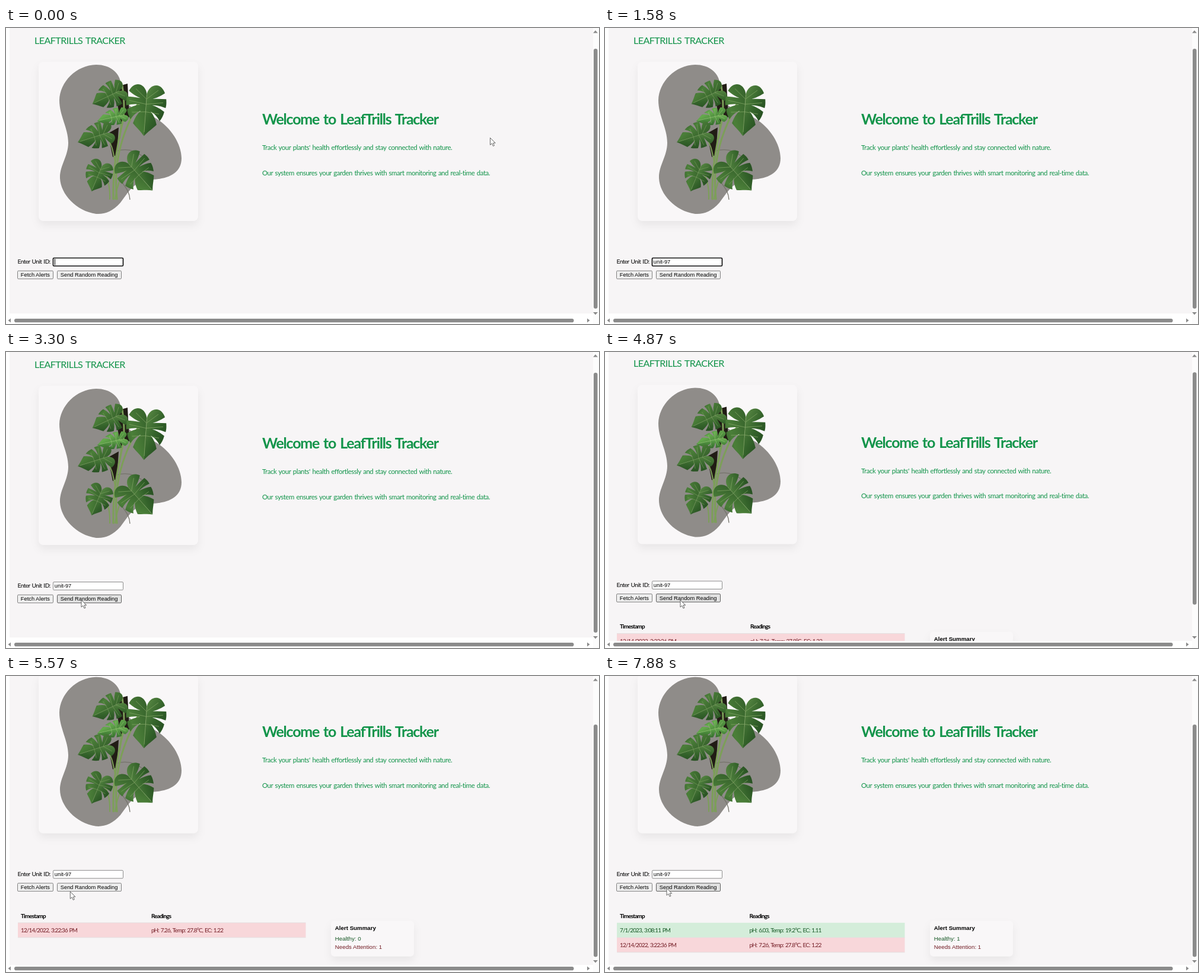
Write an HTML page that moves like this. It is 1000 px wide and 500 px high and loops after 8000 ms.

```html
<!DOCTYPE html>
<html lang="en">
<head>
<meta charset="utf-8">
<title>Plant monitor</title>
<style>
  html, body { margin: 0; width: 100%; height: 100%; overflow: hidden; background: #fff; }
  svg { display: block; width: 100vw; height: 100vh; }
  text { white-space: pre; }
  .hand { font-family: Lato, sans-serif; letter-spacing: -.038em; word-spacing: .09em; }
  .green { fill: #12944a; }
  .title { font-size: 16.2px; }
  .heading { font-size: 25px; font-weight: 700; letter-spacing: -.05em; }
  .lead { font-size: 11.4px; }
  .label { font-size: 10.2px; letter-spacing: -.055em; }
  .table { font-size: 9.9px; letter-spacing: -.08em; }
  .ui { font: 9.3px "Liberation Sans", Arial, sans-serif; }
  .summary { font: 9.72px "Liberation Sans", Arial, sans-serif; }
  .bold { font-weight: 700; }
  .healthy { fill: #155724; }
  .attention { fill: #721c24; }
  .button { fill: #efefef; stroke: #808080; }
  .shadow { filter: drop-shadow(0 7px 7px rgba(0, 0, 0, .06)); }
  .stem { fill: none; stroke: #7c9f58; stroke-width: 3; stroke-linecap: round; }
  .root { fill: none; stroke: #74736a; stroke-width: 1.3; }
  .bar { fill: #8b8b8b; }
</style>
</head>
<body>
<svg viewBox="0 0 1000 500" preserveAspectRatio="none">
  <defs>
    <linearGradient id="dark" x1="0" y1="0" x2="1" y2="1">
      <stop offset="0" stop-color="#5a8a45"/><stop offset=".45" stop-color="#35642b"/><stop offset="1" stop-color="#1b3f1a"/>
    </linearGradient>
    <linearGradient id="light" x1="0" y1="0" x2="1" y2="1">
      <stop offset="0" stop-color="#345f2a"/><stop offset=".6" stop-color="#4b7f39"/><stop offset="1" stop-color="#274f22"/>
    </linearGradient>
    <path id="half" d="M0-20C4-37 24-40 32-23Q22-16 11-13Q24-14 35-14C36-8 36-4 35 0Q22-4 11-3Q24 0 33 6C32 12 29 17 26 21Q18 10 9 7Q17 14 21 27C14 34 7 38 0 46Z"/>
    <g id="leaf">
      <use href="#half" fill="url(#dark)"/>
      <use href="#half" fill="url(#light)" transform="scale(-1 1)"/>
      <path d="M0-20V40M0-12L20-27M0-4L30-8M0 8L24 10M0-12L-20-27M0-4L-30-8M0 8L-24 10" fill="none" stroke="#86a868" stroke-width=".7"/>
    </g>
  </defs>

  <rect id="page" x="6" width="984" height="482" fill="#f7f5f6"/>

  <g id="content">
    <text class="hand title green" x="48" y="26.5">LEAFTRILLS TRACKER</text>
    <rect class="shadow" x="55" y="57" width="269" height="269" rx="8" fill="#f9f7f8"/>

    <path fill="#8f8c89" d="M152 62C176 62 195 76 194 101C194 126 215 139 240 147C271 157 296 192 296 220C296 245 274 255 246 256C216 257 206 278 193 295C180 310 166 315 152 314C117 309 91 279 91 252C91 232 105 216 105 194C105 169 90 148 90 122C91 91 118 63 152 62Z"/>
    <path fill="#211c15" d="M190 98L205 94L208 150L193 160L188 128ZM172 178L190 168L187 214L180 218Z"/>
    <path class="root" d="M186 208C205 202 220 208 232 218M192 255C200 268 208 274 209 290"/>
    <path class="stem" d="M181 289C180 240 186 215 190 190S204 150 196 97M187 289C182 240 190 200 205 165S220 130 236 112"/>
    <path class="stem" style="stroke-width:2" d="M184 226C180 205 178 195 168 180M175 289C176 265 170 248 160 235M184 289C188 262 194 248 210 232M192 186C195 168 194 160 190 149"/>
    <use href="#leaf" transform="translate(177 113) rotate(64) scale(.62 .76)"/>
    <use href="#leaf" transform="translate(236 133) rotate(4) scale(.95 1.08)"/>
    <use href="#leaf" transform="translate(183 150) rotate(76) scale(.4 .66)" style="filter:brightness(1.35)"/>
    <use href="#leaf" transform="translate(155 182) rotate(72) scale(.62 .78)"/>
    <use href="#leaf" transform="translate(156 247) rotate(22) scale(.64 .68)"/>
    <use href="#leaf" transform="translate(219 243) rotate(-42) scale(.88 .92)"/>

    <text class="hand heading green" x="432" y="163">Welcome to LeafTrills Tracker</text>
    <text class="hand lead green" x="432" y="206.3">Track your plants' health effortlessly and stay connected with nature.</text>
    <text class="hand lead green" x="432" y="248.8">Our system ensures your garden thrives with smart monitoring and real-time data.</text>

    <text class="hand label" x="19.5" y="398.3">Enter Unit ID:</text>
    <rect id="field" x="79.5" y="388.5" width="118" height="13.5" rx="1.5" fill="#fff"/>
    <text id="unit" class="ui" x="81.8" y="398.3"></text>
    <rect id="caret" x="82" y="390" width="1" height="10.5"/>
    <rect class="button" x="19.5" y="410.2" width="60" height="13.6" rx="1.5"/>
    <text class="ui" x="24.8" y="420.3">Fetch Alerts</text>
    <rect id="send" class="button" x="86.5" y="410.2" width="108" height="13.6" rx="1.5"/>
    <text class="ui" x="91.8" y="420.3">Send Random Reading</text>

    <g id="results">
      <g class="hand table">
        <text class="bold" x="25" y="468.8">Timestamp</text>
        <text class="bold reading" y="468.8">Readings</text>
        <g id="newRow" class="healthy">
          <rect x="20" y="477" width="485.5" height="25" fill="#d4edda"/>
          <text x="25" y="493.5">7/1/2023, 3:08:11 PM</text>
          <text class="reading" y="493.5">pH: 6.03, Temp: 19.2°C, EC: 1.11</text>
        </g>
        <g id="oldRow" class="attention">
          <rect x="20" y="477" width="485.5" height="25" fill="#f8d7da"/>
          <path d="M20 477H505.5M20 502H505.5" stroke="#ddd" stroke-width=".7"/>
          <text x="25" y="493.5">12/14/2022, 3:22:36 PM</text>
          <text class="reading" y="493.5">pH: 7.26, Temp: 27.8°C, EC: 1.22</text>
        </g>
      </g>
      <rect class="shadow" x="548" y="474" width="140" height="60" rx="6" fill="#f9f7f8"/>
      <text class="summary bold" x="554.8" y="489">Alert Summary</text>
      <text id="healthyCount" class="summary healthy" x="554.8" y="507.3"></text>
      <text class="summary attention" x="554.8" y="521.5">Needs Attention: 1</text>
    </g>
  </g>

  <rect id="floor" width="1000" height="20" fill="#fff"/>
  <rect width="6" height="500" fill="#fff"/>
  <rect x="990" width="10" height="500" fill="#fcfcfc"/>
  <rect id="thumb" class="bar" x="991" width="6.5" rx="3.2"/>
  <rect class="bar" x="14" y="491" width="943.5" height="6.3" rx="3.1"/>
  <path class="bar" d="M990 8.5L994 4L998 8.5ZM990 480L994 484.5L998 480ZM8 490.5L3.5 494L8 497.5ZM980 490.5L984.5 494L980 497.5Z"/>
  <path id="cursor" d="M0 0V12L2.9 9.4L5 14L7 13.1L5 8.7H8.7Z" fill="#fff" stroke="#555" stroke-width=".9"/>
</svg>
<script>
const LOOP = 8000;
const TYPED = 'unit-97';
const KEY_TIMES = [130, 220, 315, 410, 550, 635, 720];
const SHOWN = 3910, SCROLLED = 4970, ADDED = 6190;
const SCROLL = [[0, 0], [4870, 1.5], [4920, 30], [SCROLLED, 60.2]];
const POINTER = [
  [0, 816.5, 185.5], [1500, 800, 195], [1920, 145, 412], [2389, 145, 412],
  [2390, 142, 416], [2670, 142, 416], [2910, 127, 419], [5230, 127, 419],
  [5570, 108.3, 364.3], [5820, 104, 358.5], [LOOP, 104, 358.5]
];

const $ = id => document.getElementById(id);
const set = (id, attrs) => Object.entries(attrs).forEach(([k, v]) => $(id).setAttribute(k, v));
const show = (id, on) => { $(id).style.display = on ? '' : 'none'; };
const within = (t, from, to) => t >= from && t < to;
const readings = document.querySelectorAll('.reading');

function pointerAt(t) {
  const i = POINTER.findIndex(p => p[0] > t);
  const [t0, x0, y0] = POINTER[i - 1], [t1, x1, y1] = POINTER[i];
  const k = (t - t0) / (t1 - t0);
  return [x0 + (x1 - x0) * k, y0 + (y1 - y0) * k];
}

function draw(t) {
  const scroll = SCROLL.filter(s => s[0] <= t).pop()[1];
  const shown = t >= SHOWN, added = t >= ADDED, focused = t < 3190;
  const [x, y] = pointerAt(t);

  set('content', { transform: `translate(0 ${-scroll})` });
  set('page', { height: shown ? 488 : 482.5 });
  set('floor', { y: shown ? 488 : 482.5 });
  set('thumb', shown
    ? { y: 33 + scroll * .815, height: 392.5 }
    : { y: 35, height: 439 });

  const count = KEY_TIMES.filter(k => k <= t).length;
  $('unit').textContent = TYPED.slice(0, count);
  set('field', { stroke: focused ? '#111' : '#8a8a8a', 'stroke-width': focused ? 1.7 : 1 });
  show('caret', t < 980);
  set('caret', { x: 82 + (count ? $('unit').getComputedTextLength() : 0) });

  const hover = t >= 1600 && within(x, 86, 195) && within(y + scroll, 410, 424);
  const pressed = within(t, 3190, 3300);
  $('send').style.fill = pressed ? '#f5f5f5' : hover ? '#e2e2e2' : '';
  $('send').style.stroke = hover ? '#5c5c5c' : '';

  show('results', shown);
  show('newRow', added);
  set('oldRow', { transform: `translate(0 ${added ? 25 : 0})` });
  readings.forEach(r => r.setAttribute('x', added ? 243.5 : 245));
  $('healthyCount').textContent = `Healthy: ${added ? 1 : 0}`;

  show('cursor', !within(t, KEY_TIMES[0], 1600));
  set('cursor', { transform: `translate(${x} ${y})` });
}

function tick() {
  draw(performance.now() % LOOP);
  requestAnimationFrame(tick);
}
tick();
</script>
</body>
</html>
```
